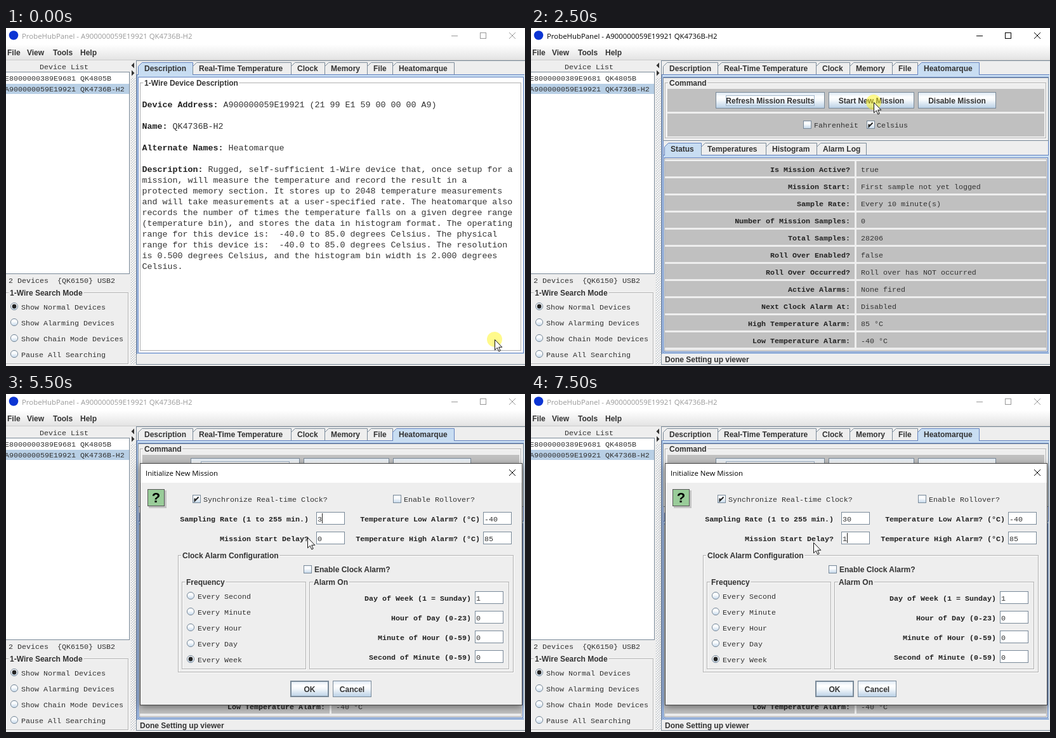
Write an HTML page that moves like this. It is 818 px wide and 533 px high and loops after 8000 ms.

```html
<!DOCTYPE html>
<html lang="en">
<head>
<meta charset="utf-8">
<title>Device viewer</title>
<style>
html, body { margin: 0; width: 100%; height: 100%; overflow: hidden; background: #eee; }
svg { display: block; width: 818px; height: 533px; }
text { white-space: pre; fill: #333; }
.ui { font: bold 12px "Liberation Sans", Arial, sans-serif; }
.win { font: 11.4px "Open Sans", "Noto Sans", sans-serif; fill: #000; }
.mono { font: 11.667px "Liberation Mono", "Courier New", monospace; }
.big { font: 13.333px "Liberation Mono", "Courier New", monospace; }
.b { font-weight: bold; fill: #222; }
rect, .crisp { shape-rendering: crispEdges; }
</style>
</head>
<body>
<svg id="stage" viewBox="0 0 818 533" xmlns="http://www.w3.org/2000/svg"></svg>
<script>
const LINE = '#7a8a99', BLUE = '#6382bf', TAB = '#c8ddf2', PANEL = '#eee', GREY = '#c0c0c0', ETCH = '#b0b0b0';
const APP = 'ProbeHubPanel', DEVICE = 'QK4736B-H2', LOGGER = 'Heatomarque';

const fill = (x, y, w, h, c) => `<rect x="${x}" y="${y}" width="${w}" height="${h}" fill="${c}"/>`;
// Outlined box given by its left, top, right and bottom pixel.
const box = (x, y, r, b, c = 'none', line = LINE) =>
  `<rect x="${x + .5}" y="${y + .5}" width="${r - x}" height="${b - y}" fill="${c}" stroke="${line}"/>`;
const text = (x, y, s, cls = 'mono', extra = '') => `<text x="${x}" y="${y}" class="${cls}" ${extra}>${s}</text>`;
const right = (x, y, s) => text(x, y, s, 'mono b', 'text-anchor="end"');
const path = (d, c, line = 'none', extra = '') => `<path d="${d}" fill="${c}" stroke="${line}" ${extra}/>`;
const each = (list, fn) => list.map(fn).join('');

const group = (x, y, r, b, title, bg = PANEL) =>
  box(x + 1, y + 1, r + 1, b + 1, 'none', '#fff') + box(x, y, r, b, 'none', ETCH) +
  text(x + 7, y + 5, title, 'ui', `stroke="${bg}" stroke-width="5" paint-order="stroke"`);

const button = (x, y, r, b, label, strong) =>
  box(x, y, r, b, 'url(#btn)') + (strong ? box(x + 1, y + 1, r - 1, b - 1) : '') +
  text((x + r) / 2 + .5, y + 18, label, 'ui', 'text-anchor="middle"');

const check = (x, y, on) => box(x, y, x + 12, y + 12, 'url(#soft)') +
  (on ? path(`M${x + 3.5} ${y + 5.5}V${y + 9.5}L${x + 9.5} ${y + 3.5}`, 'none', '#222', 'stroke-width="2"') : '');

const radio = (x, y, label, on) =>
  `<circle cx="${x}" cy="${y}" r="5.6" fill="url(#soft)" stroke="${LINE}"/>` +
  (on ? `<circle cx="${x}" cy="${y}" r="3.4" fill="#222"/>` : '') + text(x + 11, y + 5, label);

const field = (x, y, value, id = '') => box(x, y, x + 44, y + 19, '#fff') +
  text(x + 2, y + 15, value, 'mono', id && `id="${id}"`);

const tabRow = (y, edges, names, active) => each(names, (name, i) => {
  const l = edges[i] + .5, r = edges[i + 1] + .5, on = i === active;
  return path(`M${l} ${y + 20}V${y + 6.5}L${l + 6} ${y + .5}H${r}V${y + 20}`,
    on ? TAB : PANEL, on ? BLUE : LINE) + text(edges[i] + 10, y + 14, name, 'ui');
});

// Pale band under the tabs, then one thin line around the page.
const tabFrame = (x, y, r, b, from, to) =>
  fill(x, y, r - x, b - y + 2, TAB) + fill(x, y, r - x, 1, BLUE) + fill(x, y, 1, b - y + 2, BLUE) +
  box(x + 2, y + 4, r - 2, b, PANEL, BLUE) + fill(from + 1, y, to - from - 1, 1, TAB);

const defs = `<defs>
  <linearGradient id="btn" x2="0" y2="1"><stop stop-color="#dde8f3"/><stop offset=".3" stop-color="#fff"/>
    <stop offset=".5" stop-color="#f4f8fb"/><stop offset="1" stop-color="#b8cfe5"/></linearGradient>
  <linearGradient id="soft" x2="0" y2="1"><stop stop-color="#eaf1f8"/><stop offset=".35" stop-color="#fff"/>
    <stop offset="1" stop-color="#c3d7ea"/></linearGradient>
  <linearGradient id="menu" x2="0" y2="1"><stop stop-color="#fff"/><stop offset="1" stop-color="#e2e2e2"/></linearGradient>
  <pattern id="bumps" width="4" height="4" patternUnits="userSpaceOnUse">
    ${fill(0, 0, 1, 1, '#fff') + fill(1, 1, 1, 1, '#98a4b0') + fill(2, 2, 1, 1, '#fff') + fill(3, 3, 1, 1, '#98a4b0')}</pattern>
  <filter id="shadow" x="-10%" y="-10%" width="120%" height="125%">
    <feDropShadow dx="0" dy="3" stdDeviation="6" flood-opacity=".45"/></filter>
</defs>`;

function windowFrame() {
  return fill(0, 0, 818, 533, PANEL) + fill(0, 0, 818, 26, '#fff') +
    '<circle cx="12" cy="11.5" r="7.3" fill="#0c35d4"/>' +
    `<g id="title">${text(25, 17, `${APP} - A900000059E19921 ${DEVICE}`, 'win', 'style="fill:inherit;stroke:none"')}
      ${path('M702 12.5H712M747.5 7.5H756.5V16.5H747.5Z', 'none', 'inherit', 'class="crisp"')}
      ${path('M793 7L803 17M803 7L793 17', 'none', 'inherit')}</g>` +
    fill(0, 26, 818, 25, 'url(#menu)') + fill(0, 50, 818, 1, '#ccc') +
    each([[2, 'File'], [33, 'View'], [74, 'Tools'], [117, 'Help']], ([x, s]) => text(x, 43, s, 'ui'));
}

function sidebar() {
  const modes = ['Show Normal Devices', 'Show Alarming Devices', 'Show Chain Mode Devices', 'Pause All Searching'];
  return text(53, 65, 'Device List') + box(-2, 69, 194, 387, '#fff') + fill(0, 88, 194, 16, '#b8cfe5') +
    text(-2, 83, 'E8000000389E9681 QK4805B') + text(-2, 100, `A900000059E19921 ${DEVICE}`) +
    text(4, 402, '2 Devices  {QK6150} USB2') + group(-1, 417, 192, 529, '1-Wire Search Mode') +
    each(modes, (s, i) => radio(13, 439 + 25 * i, s, i === 0)) +
    fill(197, 78, 8, 453, 'url(#bumps)') +
    path('M202 54.5V63.5L197.5 59ZM198 66.5V75.5L202.5 71Z', '#333') +
    box(205, 51, 820, 530, 'none', LINE);
}

const tabEdges = [208, 294, 449, 502, 569, 609, 706];
const tabNames = ['Description', 'Real-Time Temperature', 'Clock', 'Memory', 'File', LOGGER];
const mainTabs = active => tabRow(54, tabEdges, tabNames, active) +
  tabFrame(206, 73, 817, 512, tabEdges[active], tabEdges[active + 1]);

function descriptionView() {
  const bold = s => `<tspan class="b">${s}</tspan>`;
  const lines = [
    `${bold('Device Address:')} A900000059E19921 (21 99 E1 59 00 00 00 A9)`, '',
    `${bold('Name:')} ${DEVICE}`, '',
    `${bold('Alternate Names:')} ${LOGGER}`, '',
    `${bold('Description:')} Rugged, self-sufficient 1-Wire device that, once setup for a`,
    'mission, will measure the temperature and record the result in a',
    'protected memory section. It stores up to 2048 temperature measurements',
    `and will take measurements at a user-specified rate. The ${LOGGER.toLowerCase()} also`,
    'records the number of times the temperature falls on a given degree range',
    '(temperature bin), and stores the data in histogram format. The operating',
    'range for this device is:  -40.0 to 85.0 degrees Celsius. The physical',
    'range for this device is:  -40.0 to 85.0 degrees Celsius. The resolution',
    'is 0.500 degrees Celsius, and the histogram bin width is 2.000 degrees',
    'Celsius.'];
  return mainTabs(0) + fill(209, 78, 606, 434, '#fff') +
    group(211, 86, 811, 508, '1-Wire Device Description', '#fff') +
    each(lines, (s, i) => text(214.5, 125 + 17 * i, s, 'big'));
}

function missionView() {
  const rows = [['Is Mission Active?', 'true'], ['Mission Start:', 'First sample not yet logged'],
    ['Sample Rate:', 'Every 10 minute(s)'], ['Number of Mission Samples:', '0'], ['Total Samples:', '28206'],
    ['Roll Over Enabled?', 'false'], ['Roll Over Occurred?', 'Roll over has NOT occurred'],
    ['Active Alarms:', 'None fired'], ['Next Clock Alarm At:', 'Disabled'],
    ['High Temperature Alarm:', '85 °C'], ['Low Temperature Alarm:', '-40 °C']];
  return mainTabs(5) + box(208, 78, 815, 177, PANEL, LINE) + group(211, 86, 811, 173, 'Command') +
    fill(215, 96, 594, 36, GREY) + fill(215, 135, 594, 36, GREY) +
    button(291, 101, 462, 126, 'Refresh Mission Results') + box(307, 106, 446, 122, 'none', '#a3b8cc') +
    button(469, 101, 603, 126, 'Start New Mission') + button(610, 101, 732, 126, 'Disable Mission') +
    check(429, 146) + text(446, 157, 'Fahrenheit') + check(529, 146, true) + text(545, 157, 'Celsius') +
    tabRow(181, [210, 268, 370, 450, 528], ['Status', 'Temperatures', 'Histogram', 'Alarm Log'], 0) +
    tabFrame(208, 200, 816, 510, 210, 268) + box(210, 206, 812, 508, 'none', ETCH) +
    each(rows, ([name, value], i) => {
      const y = 210 + 27 * i;
      return fill(211, y, 299, 24, GREY) + fill(513, y, 299, 24, GREY) +
        right(503, y + 17, name) + text(520, y + 17, value);
    }) + text(211, 527, 'Done Setting up viewer', 'ui');
}

function dialog() {
  const alarms = [['Day of Week (1 = Sunday)', 1], ['Hour of Day (0-23)', 0],
    ['Minute of Hour (0-59)', 0], ['Second of Minute (0-59)', 0]];
  return `<g filter="url(#shadow)">${box(211, 109, 813, 490, PANEL, '#444')}</g>` +
    fill(212, 110, 601, 30, '#fff') + text(220, 129, 'Initialize New Mission', 'win') +
    path('M793 119L803 129M803 119L793 129', 'none', '#000') +
    fill(225, 152, 28, 28, '#c4c4c4') + box(223, 150, 249, 176, '#9c9', '#555') +
    text(236.5, 171, '?', 'ui', 'text-anchor="middle" style="font-size:22px;fill:#000"') +
    `<g id="syncOff">${check(294, 159)}</g><g id="syncOn">${check(294, 159, true)}</g>
     <g id="syncHeld">${box(294, 159, 306, 171, '#a3c0dd') + box(309, 156, 514, 174, 'none', '#b8cfe5')}</g>` +
    text(311, 170, 'Synchronize Real-time Clock?') +
    check(610, 159) + text(627, 170, 'Enable Rollover?') +
    right(477, 201, 'Sampling Rate (1 to 255 min.)') + field(489, 186, '10', 'rate') +
    right(477, 232, 'Mission Start Delay?') + field(489, 217, '0', 'delay') +
    right(747, 201, 'Temperature Low Alarm? (°C)') + field(752, 186, '-40') +
    right(747, 232, 'Temperature High Alarm? (°C)') + field(752, 217, '85') +
    group(271, 254, 799, 438, 'Clock Alarm Configuration') +
    check(469, 270) + text(486, 281, 'Enable Clock Alarm?', 'ui') +
    group(277, 296, 472, 433, 'Frequency') + group(478, 296, 792, 433, 'Alarm On') +
    each(['Second', 'Minute', 'Hour', 'Day', 'Week'], (s, i) => radio(291, 318 + 25 * i, 'Every ' + s, i === 4)) +
    each(alarms, ([s, v], i) => right(733, 326 + 31 * i, s) + field(739, 311 + 31 * i, v)) +
    button(448, 452, 508, 477, 'OK', true) + button(515, 452, 575, 477, 'Cancel') +
    '<rect id="caret" width="1" height="16" fill="#222"/>';
}

const pointer = '<circle id="halo" r="12" fill="#fff51a" fill-opacity=".5"/>' +
  `<g id="arrow">${path('M.5 .5V16.8L4.3 13.2L6.8 19L9.2 18L6.7 12.3H11.8Z', '#fff', '#111')}</g>` +
  `<g id="beam">${path('M-3 -7.5H-1L.5 -6.5L2 -7.5H4M.5 -6.5V7.5M-3 8.5H-1L.5 7.5L2 8.5H4', 'none', '#222')}</g>`;

document.getElementById('stage').innerHTML = defs + windowFrame() + sidebar() +
  `<g id="describe">${descriptionView()}</g><g id="mission">${missionView()}</g><g id="setup">${dialog()}</g>` +
  `<g id="pointer">${pointer}</g>`;

const ids = ['title', 'describe', 'mission', 'setup', 'syncOff', 'syncOn', 'syncHeld',
  'rate', 'delay', 'caret', 'pointer', 'halo', 'arrow', 'beam'];
const el = Object.fromEntries(ids.map(id => [id, document.getElementById(id)]));
const show = (id, on) => el[id].setAttribute('display', on ? 'inline' : 'none');

const LOOP = 8000;
// Each step carries over whatever it does not change.
const steps = [
  { at: 0, view: 'describe', x: 770, y: 491, halo: true, active: false, rate: '10', delay: '0', sync: 'syncOff' },
  { at: 1500, x: 643, y: 61, active: true },
  { at: 2500, view: 'mission', x: 540, y: 117 },
  { at: 3500, setup: true, active: false, x: 399, y: 167, sync: 'syncHeld' },
  { at: 4500, x: 525, y: 200, beam: true, sync: 'syncOn', caret: [505, 188] },
  { at: 5500, x: 475, y: 226, beam: false, halo: false, rate: '3', caret: [498, 188] },
  { at: 6000, rate: '30', caret: [505, 188] },
  { at: 6500, x: 508, y: 226, beam: true, halo: true, caret: [498, 219] },
  { at: 7500, x: 445, y: 234, beam: false, halo: false, delay: '1' }
];

function draw(t) {
  const s = Object.assign({}, ...steps.filter(step => step.at <= t));
  el.title.style.fill = el.title.style.stroke = s.active ? '#000' : '#999';
  show('describe', s.view === 'describe');
  show('mission', s.view === 'mission');
  show('setup', s.setup);
  for (const id of ['syncOff', 'syncOn', 'syncHeld']) show(id, s.sync === id);
  el.rate.textContent = s.rate;
  el.delay.textContent = s.delay;
  show('caret', s.caret);
  if (s.caret) {
    el.caret.setAttribute('x', s.caret[0]);
    el.caret.setAttribute('y', s.caret[1]);
  }
  el.pointer.setAttribute('transform', `translate(${s.x} ${s.y})`);
  show('halo', s.halo);
  show('arrow', !s.beam);
  show('beam', s.beam);
}

const start = performance.now();
function tick() {
  draw((performance.now() - start) % LOOP);
  requestAnimationFrame(tick);
}
tick();
</script>
</body>
</html>
```
